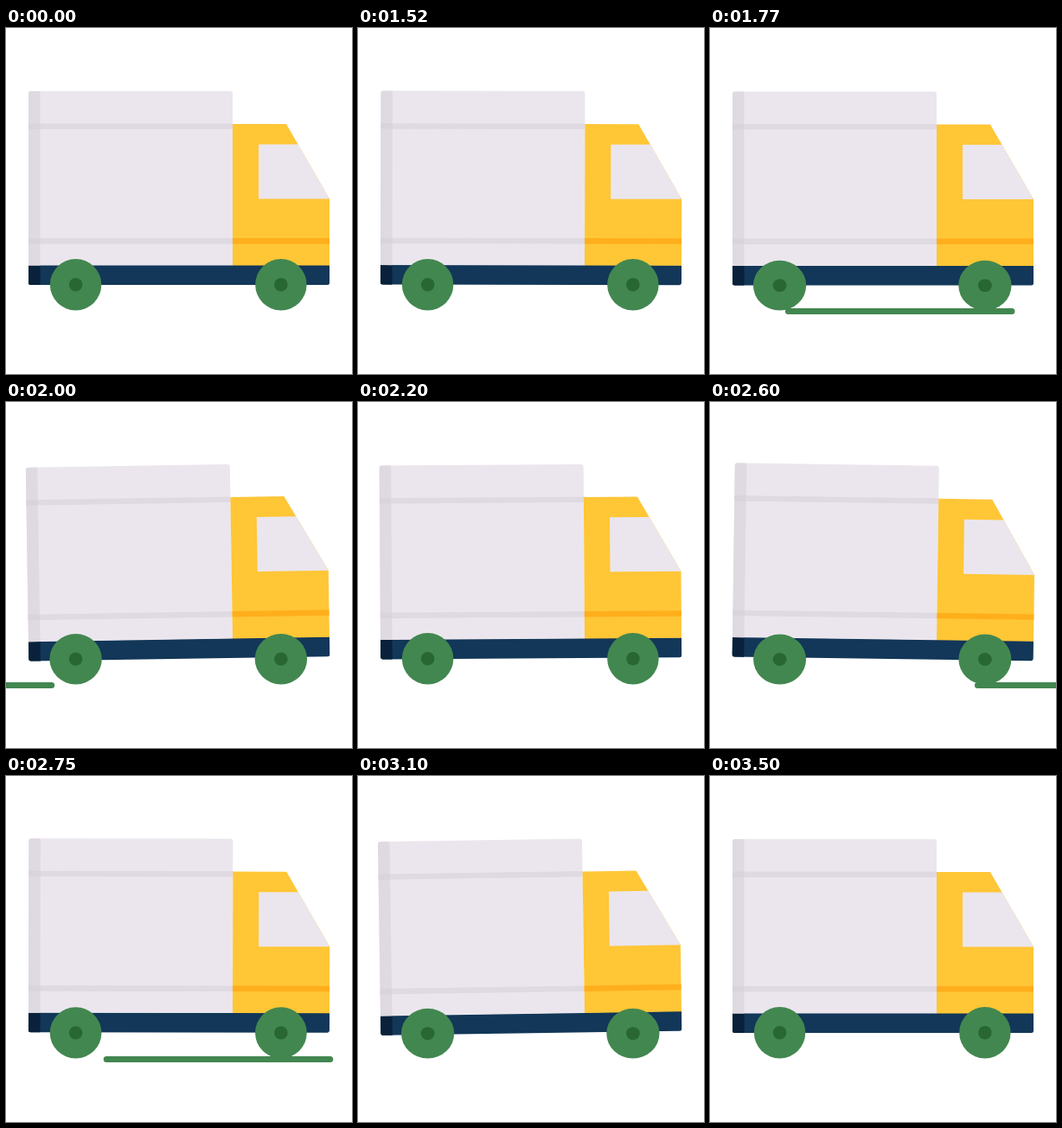
Animation, 400 px wide and 400 px high, one loop 3520 ms. Source, as an HTML page with a canvas:

```html
<!DOCTYPE html>
<html lang="en">
<head>
<meta charset="utf-8">
<title>Delivery truck</title>
<style>
  html, body { margin: 0; width: 100%; height: 100%; overflow: hidden; background: #fff; }
  canvas { display: block; width: 400px; height: 400px; }
</style>
</head>
<body>
<canvas id="stage"></canvas>
<script>
const LOOP = 3520, START = 1500, DRIVE = 2000, SWAY = 1000;
const MAX_TILT = 0.016, SQUASH = 2;
const PIVOT = { x: 200, y: 275 };
const GREEN = '#428750', PANEL = '#ebe6ed', SHADE = '#dfd9e1';

const canvas = document.getElementById('stage');
const ctx = canvas.getContext('2d');
const ratio = window.devicePixelRatio || 1;
canvas.width = canvas.height = 400 * ratio;

// Quick lean back, a steady sway, then settling from the last forward lean
function tiltAt(u) {
  const peak = SWAY + 20, settle = peak + SWAY / 2;
  if (u > settle) {
    return -MAX_TILT * (1 + Math.cos(Math.PI * (u - settle) / (DRIVE - settle))) / 2;
  }
  const rise = Math.min(1, u / 150);
  return MAX_TILT * rise * Math.cos(2 * Math.PI * (u - peak) / SWAY);
}

function rect(color, x, y, w, h, radii = 0) {
  ctx.fillStyle = color;
  ctx.beginPath();
  ctx.roundRect(x, y, w, h, radii);
  ctx.fill();
}

function poly(color, ...points) {
  ctx.fillStyle = color;
  ctx.beginPath();
  for (const [x, y] of points) ctx.lineTo(x, y);
  ctx.fill();
}

function disc(color, r) {
  ctx.fillStyle = color;
  ctx.beginPath();
  ctx.arc(0, 0, r, 0, Math.PI * 2);
  ctx.fill();
}

function drawBody(tilt, lift) {
  ctx.save();
  ctx.translate(PIVOT.x, PIVOT.y + lift);
  ctx.rotate(tilt);
  ctx.translate(-PIVOT.x, -PIVOT.y);

  rect('#123758', 26, 274, 348, 23, [0, 0, 2.5, 2.5]);
  rect('#09213a', 26, 274, 13.5, 23, [0, 0, 0, 2.5]);

  rect(PANEL, 26, 73, 236, 201.5, [3, 3, 0, 0]);
  rect(SHADE, 26, 73, 13.5, 201.5, [3, 0, 0, 0]);
  for (const y of [110.5, 243]) {
    rect(SHADE, 39.5, y, 222.5, 6.5);
    rect('#d9d3dc', 26, y, 13.5, 6.5);
  }

  poly('#ffc636', [262, 111], [324, 111], [374, 197.5], [374, 274.5], [262, 274.5]);
  rect('#ffae1c', 262, 243, 112, 6.5);
  poly(PANEL, [292, 134.5], [337.6, 134.5], [374, 197.5], [292, 197.5]);
  ctx.restore();
}

// Wheels flatten against the ground
function drawWheel(x, squash) {
  const r = 29.7, ground = 326.4;
  const sy = 1 - squash / (2 * r);
  ctx.save();
  ctx.translate(x, ground - r * sy);
  ctx.scale(1 + squash / (2 * r), sy);
  disc(GREEN, r);
  disc('#286731', 7.7);
  ctx.restore();
}

function drawRoad(u) {
  rect(GREEN, 436 - 1.288 * (u % SWAY), 324, 265.5, 7, 3.5);
}

function draw(t) {
  const moving = t >= START + 20 && t < START + DRIVE;
  const u = moving ? t - START : 0;
  const phase = Math.PI * u / DRIVE;
  const squash = SQUASH * Math.sin(3 * phase) ** 2;
  const lift = 0.4 * squash - 0.7 * Math.sin(phase);

  ctx.setTransform(ratio, 0, 0, ratio, 0, 0);
  ctx.fillStyle = '#fff';
  ctx.fillRect(0, 0, 400, 400);
  drawBody(tiltAt(u), lift);
  if (moving) drawRoad(u);
  drawWheel(80.6, squash);
  drawWheel(317.9, squash);
}

const begin = performance.now();
function tick() {
  draw((performance.now() - begin) % LOOP);
  requestAnimationFrame(tick);
}
tick();
</script>
</body>
</html>
```
